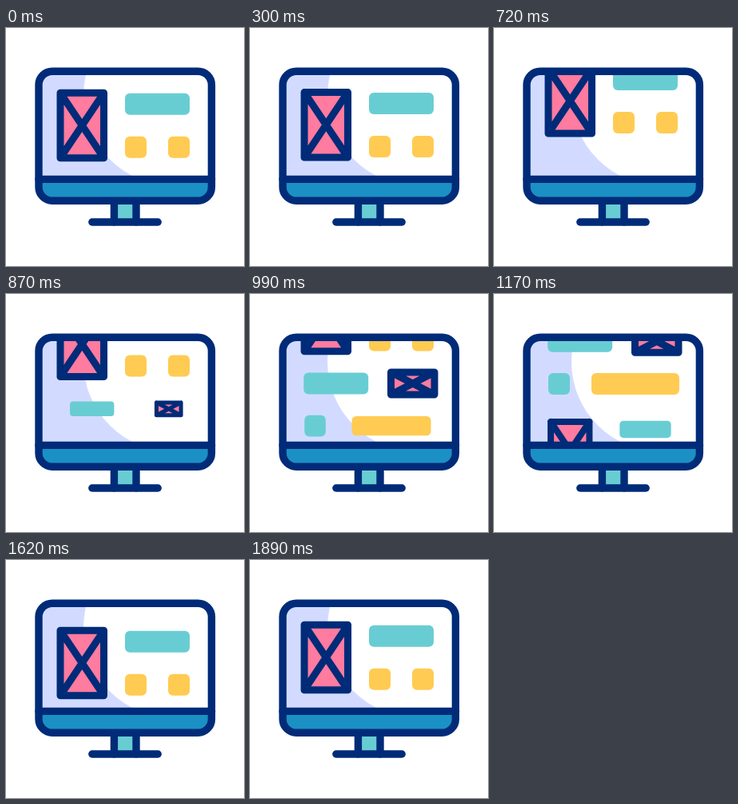
These frames come from a looping animation (298 px wide and 298 px high, 2250 ms). An HTML page with a canvas:

```html
<!DOCTYPE html>
<html lang="en">
<head>
<meta charset="utf-8">
<title>Scrolling page on a monitor</title>
<style>
  html, body { margin: 0; width: 100%; height: 100%; overflow: hidden; background: #fff; }
  canvas { display: block; width: 100vw; height: 100vh; }
</style>
</head>
<body>
<canvas id="stage"></canvas>
<script>
const SIZE = 298, LOOP = 2250, TICK = 30;
const SCROLL = { start: 210, time: 1680, distance: 218, influence: 0.57 };
const POP = 240;
const NAVY = '#002b78', BLUE = '#1b90c5', TEAL = '#68cdd3', YELLOW = '#ffcb52',
      PINK = '#ff7b9f', LILAC = '#d2dbff';

const canvas = document.getElementById('stage');
const ctx = canvas.getContext('2d');
const ratio = Math.max(1, window.devicePixelRatio || 1);
canvas.width = canvas.height = Math.round(SIZE * ratio);

const clamp = v => Math.min(1, Math.max(0, v));
const smooth = s => s * s * (3 - 2 * s);

// Symmetric bezier ease with handles at (a, 0) and (1 - a, 1)
function ease(u, a) {
  let lo = 0, hi = 1;
  for (let i = 0; i < 24; i++) {
    const s = (lo + hi) / 2, r = 1 - s;
    const x = 3 * a * s * r * r + 3 * (1 - a) * s * s * r + s * s * s;
    if (x < u) lo = s; else hi = s;
  }
  return smooth((lo + hi) / 2);
}

function box(x, y, w, h, r) {
  ctx.beginPath();
  ctx.roundRect(x, y, w, h, r);
}

function block(w, h, color) {
  ctx.fillStyle = color;
  box(-w / 2, -h / 2, w, h, 6);
  ctx.fill();
}

function picture(w, h) {
  const x = w / 2, y = h / 2;
  ctx.fillStyle = PINK;
  ctx.fillRect(-x, -y, w, h);
  ctx.strokeStyle = NAVY;
  ctx.lineWidth = 9;
  ctx.beginPath();
  ctx.rect(-x, -y, w, h);
  ctx.moveTo(-x, -y);
  ctx.lineTo(x, y);
  ctx.moveTo(x, -y);
  ctx.lineTo(-x, y);
  ctx.stroke();
}

const bar = color => () => block(81, 27, color);
const square = color => () => block(27, 27, color);
const portrait = () => picture(54.5, 81.5);

// The first section returns at the end of the scroll
function section(y, pops) {
  return [
    { x: 95.25, y: y + 122, draw: portrait, pop: pops[0] },
    { x: 189.5, y: y + 95.2, draw: bar(TEAL), pop: pops[1] },
    { x: 162.5, y: y + 149.2, draw: square(YELLOW), pop: pops[2] },
    { x: 216.5, y: y + 149.2, draw: square(YELLOW), pop: pops[3] }
  ];
}

const items = [
  ...section(0, [-POP, -POP, -POP, -POP]),
  { x: 107.7, y: 203, draw: bar(TEAL), pop: 720 },
  { x: 203.75, y: 203, draw: () => picture(54.5, 28), pop: 740 },
  { x: 81.5, y: 256.2, draw: square(TEAL), pop: 768 },
  { x: 177, y: 256.2, draw: () => block(110, 27, YELLOW), pop: 797 },
  ...section(SCROLL.distance, [980, 1000, 1030, 1055])
];

function drawPage(t) {
  const u = clamp((t - SCROLL.start) / SCROLL.time);
  const offset = SCROLL.distance * ease(u, SCROLL.influence);
  ctx.save();
  box(41, 54, 216.5, 162.5, 17);
  ctx.clip();
  ctx.fillStyle = LILAC;
  ctx.fillRect(41, 54, 217, 136);
  ctx.fillStyle = '#fff';
  ctx.beginPath();
  ctx.arc(209.5, 85, 112.5, 0, Math.PI * 2);
  ctx.fill();
  for (const item of items) {
    const scale = smooth(clamp((t - item.pop) / POP));
    const y = item.y - offset;
    if (scale < 0.01 || y < 0 || y > 250) continue;
    ctx.save();
    ctx.translate(item.x, y);
    ctx.scale(scale, scale);
    item.draw();
    ctx.restore();
  }
  ctx.fillStyle = BLUE;
  ctx.fillRect(41, 189.5, 217, 28);
  ctx.restore();
}

function line(x1, y1, x2, y2) {
  ctx.beginPath();
  ctx.moveTo(x1, y1);
  ctx.lineTo(x2, y2);
  ctx.stroke();
}

function drawMonitor() {
  ctx.fillStyle = TEAL;
  ctx.fillRect(135, 217, 28, 26);
  ctx.strokeStyle = NAVY;
  ctx.lineWidth = 9.4;
  line(135.4, 217, 135.4, 243);
  line(163, 217, 163, 243);
  line(107.8, 243, 190.2, 243);
  line(41, 189.4, 257.5, 189.4);
  box(41, 54.2, 216.4, 162, 17);
  ctx.stroke();
}

function frame(now) {
  const t = Math.floor((now % LOOP) / TICK) * TICK;
  ctx.setTransform(canvas.width / SIZE, 0, 0, canvas.height / SIZE, 0, 0);
  ctx.fillStyle = '#fff';
  ctx.fillRect(0, 0, SIZE, SIZE);
  ctx.lineCap = ctx.lineJoin = 'round';
  drawPage(t);
  drawMonitor();
}

const begin = performance.now();
function loop() {
  frame(performance.now() - begin);
  requestAnimationFrame(loop);
}
loop();
</script>
</body>
</html>
```
